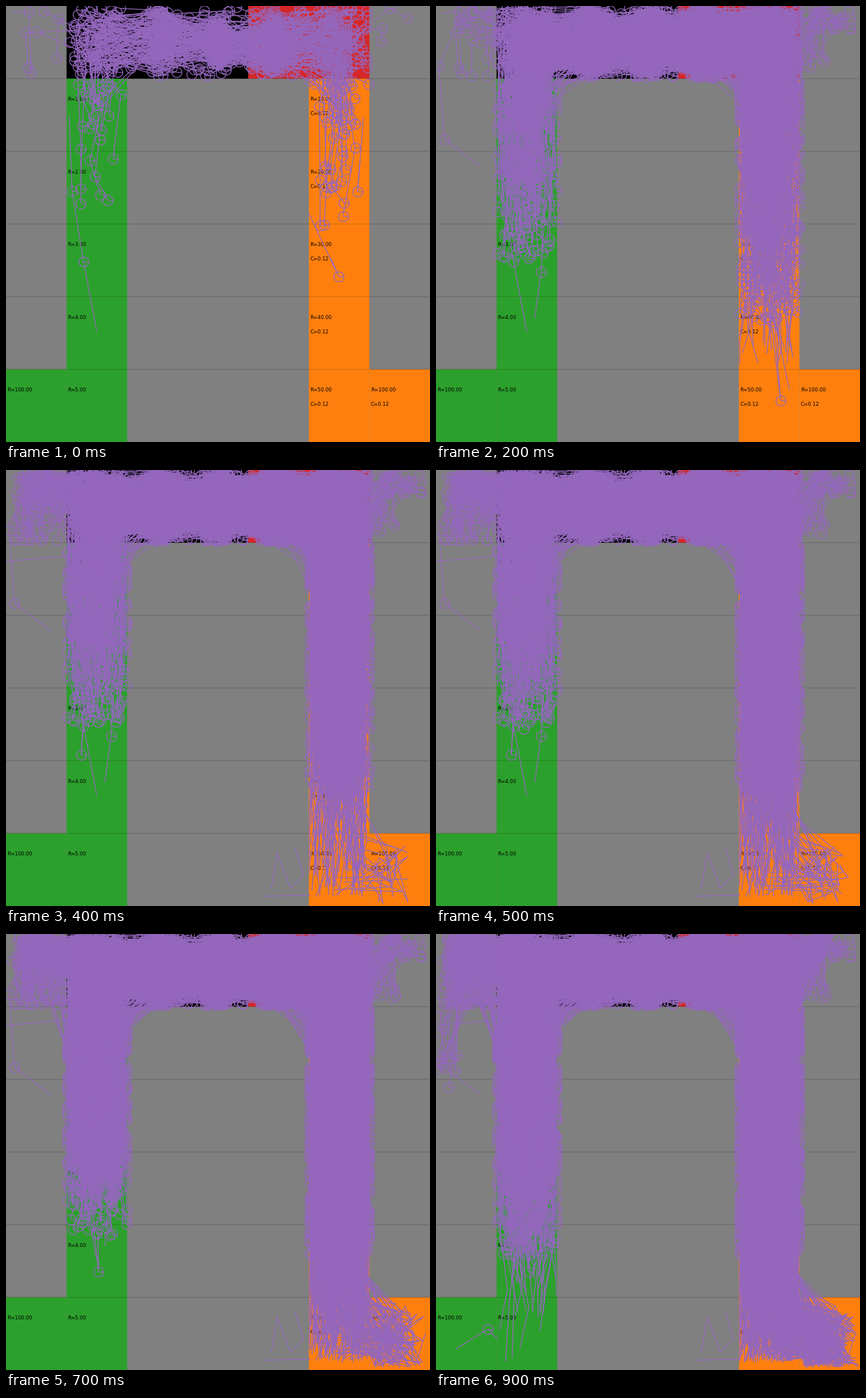
A matplotlib script for the animation above (1 s loop, 738 by 759 pixels).

```python
import numpy as np
import matplotlib.pyplot as plt
from matplotlib.animation import FuncAnimation
from matplotlib.collections import LineCollection
from matplotlib.patches import Rectangle

W, H, DPI = 738, 759, 100
CW, CH = W / 7, H / 6
PX = 72 / DPI
PURPLE, GREEN, ORANGE = "#9467bd", "#2ca02c", "#ff7f0e"
STEPS = 10
RADIUS = 8.7

rng = np.random.default_rng(12)

# Outlying walks: step at which each appears, and its key points
STRAYS = [
    (0, [(110, 192), (115, 322), (135, 445), (158, 567)]),
    (0, [(527, 361), (579, 471), (566, 440)]),
    (0, [(622, 194), (612, 323), (616, 270)]),
    (0, [(10, 12), (40, 10), (44, 117), (43, 90)]),
    (1, [(577, 500), (600, 687), (588, 540), (615, 668)]),
    (2, [(105, 15), (40, 25), (5, 105), (15, 232), (78, 280)]),
    (2, [(190, 350), (183, 463), (172, 543)]),
    (3, [(137, 380), (131, 496), (135, 440)]),
    (3, [(462, 728), (472, 667), (495, 728), (518, 705), (503, 657)]),
    (3, [(0, 159), (105, 150)]),
    (4, [(450, 742), (530, 740)]),
    (7, [(152, 500), (161, 588), (160, 510)]),
    (8, [(35, 722), (90, 688), (107, 705)]),
]


def pulse(step, at, width):
    return np.exp(-((step - at) / width) ** 2)


def mirror(points):
    return [(W - x, y) for x, y in points]


def top_y(a=1.4):
    return 1 + 124 * rng.beta(a, a)


def arm_walk(step, end=None):
    """Walk from the middle of the top corridor into the left arm, down to end."""
    a = max(1.9, 5 - 3 * step)
    lane = 106 + 104 * rng.beta(a, a)

    def lane_x():
        return np.clip(lane + rng.normal(0, 11), 106.5, 209.5)

    points = [(rng.normal(368, 9), top_y(a)),
              (rng.normal(270, 14), top_y(2 if step == 0 else 1.4))]
    if end is None:
        return points + [(lane_x(), top_y())] * (rng.random() < 0.65)
    if rng.random() > 0.13:
        points.append((lane_x(), top_y()))
    y = rng.uniform(130, 210)
    while y < end - 25:
        points.append((lane_x(), y))
        y += rng.uniform(90, 130)
    return points + [(lane_x(), end)]


def arm(step, tops, downs, near, far, skew):
    ends = near + (far - near) * rng.random(int(downs)) ** skew
    return ([arm_walk(step) for _ in range(int(tops))]
            + [arm_walk(step, end) for end in ends])


def left_arm(step):
    t = step / (STEPS - 1)
    downs = 20 + 4 * step + 130 * pulse(step, 2, 0.5) + 140 * pulse(step, 6.5, 0.9)
    far = 360 + 40 * min(step, 2) + 310 * t ** 5
    return arm(step, 110 * 0.78 ** step, downs, 140 + 340 * t ** 2, far, 1.4)


def right_arm(step):
    downs = 40 + 180 * min(step, 1) - 15 * step
    far = min(400 + 115 * step, 747)
    walks = arm(step, 110 * 0.78 ** step, downs, 130 + 48 * step, far, 2.3 * 0.8 ** step)
    return [mirror(walk) for walk in walks]


def wander(step):
    """Zigzag anywhere along the top corridor."""
    x = rng.uniform(110, 520)
    return [(min(x + 95 * i + rng.normal(0, 18), 628), 1 + 122 * rng.beta(1.1, 1.3))
            for i in range(rng.integers(2, 4))]


def left_wing(step):
    x, y = 18 + 85 * rng.beta(1.3, 1.5), 100 * rng.beta(1, 2)
    points = [(rng.uniform(110, 165), rng.uniform(2, 95)), (x, y)]
    if rng.random() < 0.45:
        points.append((x + rng.normal(0, 7), min(y + rng.uniform(25, 85), 122)))
    elif step > 7 and rng.random() < 0.3:
        points.append((rng.uniform(2, 36), rng.uniform(140, 300)))
    elif step > 5 and rng.random() < 0.25:
        points += [(rng.uniform(70, 100), 115), (rng.uniform(107, 112), 215)]
    return points


def right_wing(step):
    u = rng.random()
    x, y = 640 + 42 * u, 2 + 110 * (1 - u) * rng.random()
    points = [(rng.uniform(575, 630), rng.uniform(2, 110)), (x, y)]
    if step < 7:
        drop = rng.random() < 0.5
        points.append((x + rng.normal(0, 8), rng.uniform(50, 118)) if drop
                      else (rng.uniform(680, 728), rng.uniform(8, 45)))
    return points


def spill(step):
    """Fan of lines from the foot of the right arm into the corner cell."""
    points = [(rng.uniform(565, 627), rng.uniform(560 if step > 3 else 650, 745))]
    reach = min(45 + 8 * step, 96)
    for _ in range(rng.integers(1, 4)):
        points.append((640 + reach * rng.beta(1, 1.6), 640 + 116 * rng.beta(1.7, 1.2)))
    return points


def walks_at(step):
    groups = [
        (wander, 80 * 0.6 ** step),
        (left_wing, 4 + 42 * pulse(step, 3.5, 1.2) + 45 * pulse(step, 9, 2)),
        (right_wing, 2 + 16 * pulse(step, 1, 0.5) + 48 * pulse(step, 9, 1)),
        (spill, 6 + 1.6 * (step - 2) ** 2 if step > 2 else 0),
    ]
    walks = left_arm(step) + right_arm(step)
    for make, count in groups:
        walks += [make(step) for _ in range(int(count))]
    return walks


def draw_walks(ax, walks, strays):
    dots = [p for walk in walks for p in walk if p[1] < 560]
    dots += [p for walk in strays for p in walk[1:-1] if not 440 < p[0] < 525]
    ticks = [[(x, y), (x + RADIUS, y)] for x, y in dots]
    lines = ax.add_collection(LineCollection(walks + strays + ticks, colors=PURPLE,
                                             linewidths=1.4 * PX, zorder=3))
    rings, = ax.plot(*np.array(dots).T, "o", ms=2 * RADIUS * PX, mfc="none",
                     mec=PURPLE, mew=1.4 * PX, zorder=3)
    return [lines, rings]


def cell(ax, col, row, color, cols=1, rows=1):
    ax.add_patch(Rectangle((col * CW, row * CH), cols * CW, rows * CH,
                           fc=color, ec="none", lw=0, snap=False, zorder=1))


def label(ax, col, row, reward, cost=None):
    lines = [(0.305, f"R={reward:.2f}")]
    if cost is not None:
        lines.append((0.505, f"C={cost:.2f}"))
    for dy, text in lines:
        ax.text((col + 0.02) * CW, (row + dy) * CH, text, fontsize=8.6 * PX,
                family="DejaVu Sans", va="baseline", zorder=2)


fig = plt.figure(figsize=(W / DPI, H / DPI), dpi=DPI, facecolor="#808080")
ax = fig.add_axes([0, 0, 1, 1])
ax.set(xlim=(0, W), ylim=(H, 0))
ax.axis("off")

cell(ax, 1, 0, "black", cols=3)
cell(ax, 4, 0, "#d62728", cols=2)
cell(ax, 1, 1, GREEN, rows=5)
cell(ax, 0, 5, GREEN)
cell(ax, 5, 1, ORANGE, rows=5)
cell(ax, 6, 5, ORANGE)
for row in range(1, 6):
    ax.plot([0, W], [row * CH] * 2, color="black", alpha=0.25, lw=0.8 * PX,
            snap=False, zorder=1.5)
    label(ax, 1, row, row)
    label(ax, 5, row, 10 * row, 0.12)
label(ax, 0, 5, 100)
label(ax, 6, 5, 100, 0.12)

batches = [draw_walks(ax, walks_at(step), [points for at, points in STRAYS if at == step])
           for step in range(STEPS)]


def update(step):
    for i, batch in enumerate(batches):
        for artist in batch:
            artist.set_visible(i <= step)
    return [artist for batch in batches for artist in batch]


anim = FuncAnimation(fig, update, frames=STEPS, interval=100, repeat=True, repeat_delay=0)
plt.show()
```
